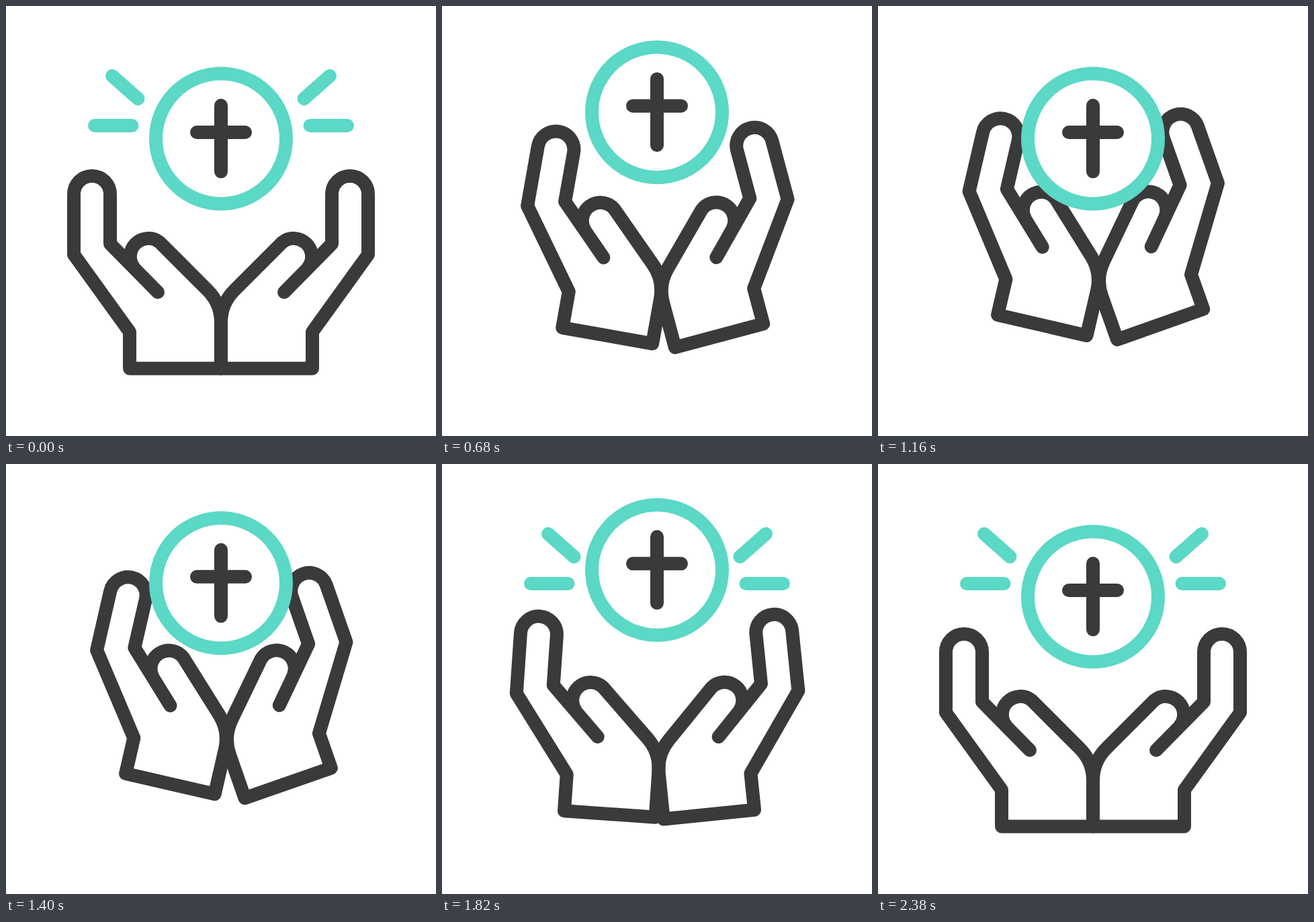
These frames come from a looping animation (640 px wide and 640 px high, 2400 ms). An HTML page:

```html
<!DOCTYPE html>
<html lang="en">
<head>
<meta charset="utf-8">
<title>Open hands</title>
<style>
  html, body { margin: 0; width: 100%; height: 100%; overflow: hidden; background: #fff; }
  svg { display: block; width: 100%; height: 100%; }
  svg * { fill: none; stroke-width: 20; stroke-linecap: round; stroke-linejoin: round; }
  .dark { stroke: #3a3a3a; }
  .teal { stroke: #5bd8c6; }
</style>
</head>
<body>
<svg viewBox="0 0 640 640">
  <defs>
    <path id="hand" d="M226 426 L155 354 V280 A27 27 0 0 0 101 280 V370 L184 485 V539.5 H320 V471
      A68 68 0 0 0 300 423 L229 352 A27 27 0 0 0 191 390"/>
    <g id="rays">
      <path class="ray" d="M196.5 138 L158 104" pathLength="1"/>
      <path class="ray" d="M187.5 178 H132" pathLength="1"/>
    </g>
  </defs>
  <g class="teal">
    <use href="#rays"/>
    <use href="#rays" transform="translate(640) scale(-1 1)"/>
  </g>
  <g class="dark">
    <use id="left" href="#hand"/>
    <g transform="translate(640) scale(-1 1)"><use id="right" href="#hand"/></g>
  </g>
  <g id="coin">
    <circle class="teal" cx="320" cy="197.5" r="97"/>
    <path class="dark" d="M320 148 V246.5 M284 188 H356"/>
  </g>
</svg>
<script>
const LOOP = 2400;
const $ = id => document.getElementById(id);
const rays = document.querySelectorAll('.ray');

const progress = (t, from, to) => Math.min(1, Math.max(0, (t - from) / (to - from)));
const smooth = x => x * x * (3 - 2 * x);
const softLinear = x => (x + smooth(x)) / 2;

// Symmetric cubic-bezier(a, 0, 1 - a, 1)
function sharpEase(x, a = 0.83) {
  let lo = 0, hi = 1;
  for (let i = 0; i < 24; i++) {
    const s = (lo + hi) / 2, r = 1 - s;
    const bx = 3 * s * r * r * a + 3 * s * s * r * (1 - a) + s * s * s;
    if (bx < x) lo = s; else hi = s;
  }
  return smooth(lo);
}

// Up while the first span runs, back down during the second
const swing = (t, ease, up, top, down, end) =>
  ease(progress(t, up, top)) - ease(progress(t, down, end));

function pose(id, amount, angle, dx, dy) {
  $(id).setAttribute('transform',
    `translate(${dx * amount} ${dy * amount}) rotate(${angle * amount} 210 396)`);
}

function draw(now) {
  const t = now % LOOP;

  const close = swing(t, sharpEase, 0, 1200, 1235, 2315);
  pose('left', close, 13.1, 25.9, -70.2);
  pose('right', close, 19.5, 18.2, -71.5);

  const lift = swing(t, softLinear, 0, 560, 560, 1160) + swing(t, softLinear, 1160, 1700, 1700, 2320);
  $('coin').setAttribute('transform', `translate(0 ${-46.5 * lift})`);

  // Rays leave outwards, then grow back from the coin
  const leaving = t < 1200;
  const from = leaving ? smooth(progress(t, 20, 240)) : 0;
  const to = leaving ? 1 : smooth(progress(t, 1560, 1800));
  for (const ray of rays) {
    ray.style.visibility = to > from ? 'visible' : 'hidden';
    ray.style.strokeDasharray = `${to - from} 2`;
    ray.style.strokeDashoffset = -from;
  }
  requestAnimationFrame(draw);
}
requestAnimationFrame(draw);
</script>
</body>
</html>
```
